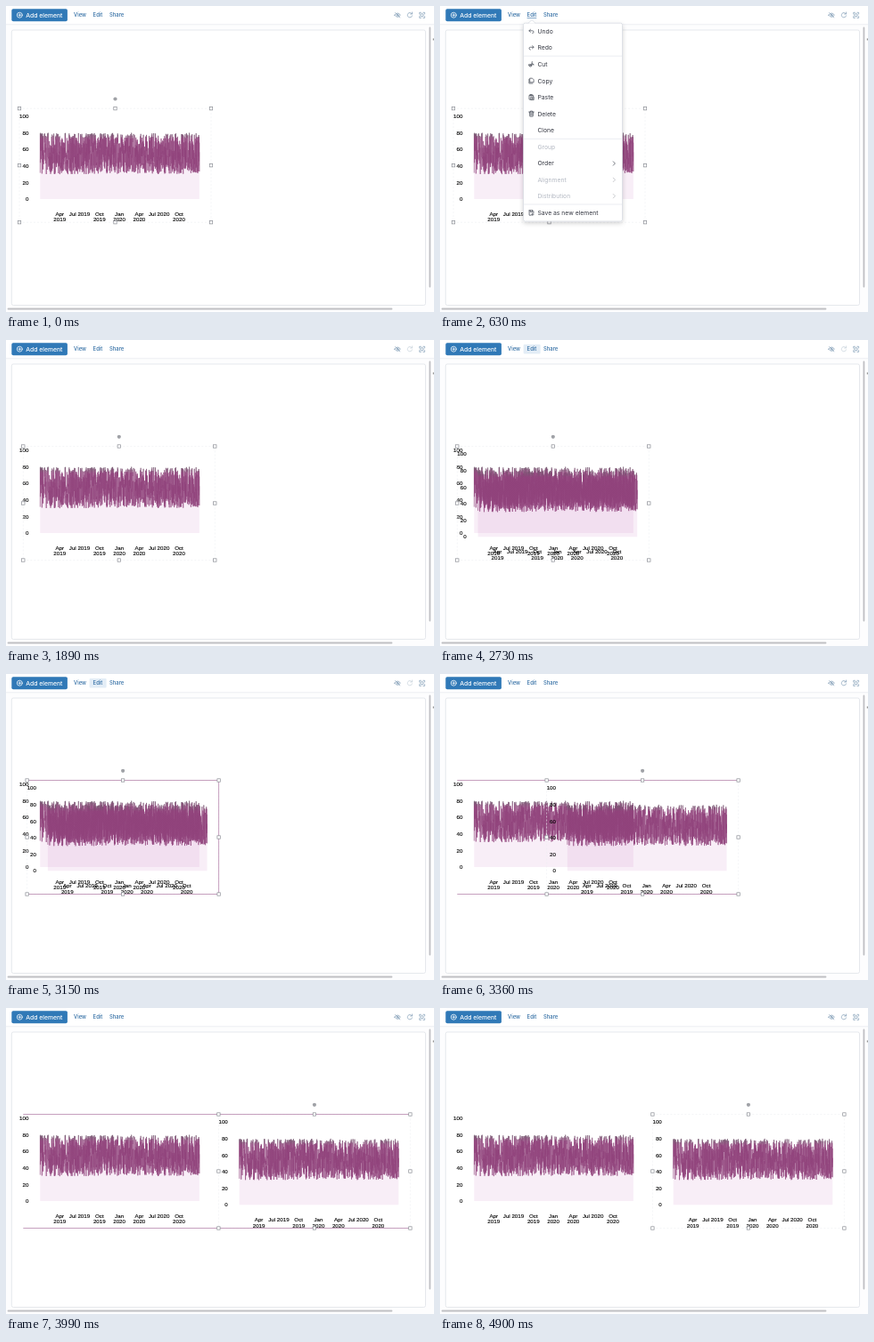
These frames come from a looping animation (480x344 px, 4.97 s). An HTML page:

```html
<!DOCTYPE html>
<html lang="en">
<head>
<meta charset="utf-8">
<title>Clone a chart</title>
<style>
  html, body { margin: 0; width: 100%; height: 100%; overflow: hidden; background: #fff; }
  svg { display: block; width: 100vw; height: 100vh; }
  text { font: 6.8px Inter, sans-serif; fill: #343741; }
  .axis text { font: 6.2px "Liberation Sans", Arial, sans-serif; fill: #000; stroke: #000; stroke-width: .12; }
  .link { font-size: 5.9px; font-weight: 500; fill: #2f6ca3; }
  .button { font-weight: 500; fill: #fff; }
  .off { fill: #b4b9c3; }
  .icon { fill: none; stroke: #4a4f5a; stroke-width: .75; stroke-linecap: round; stroke-linejoin: round; }
  .tool { stroke: #7f9bb5; stroke-width: .7; }
  .faded { stroke: #c3ced9; }
  .rule { stroke: #e3e6ec; stroke-width: .7; }
  .handle { fill: #fff; stroke: #8b8e95; stroke-width: .7; }
  .guide { stroke: #b888ae; stroke-width: .8; fill: none; }
</style>
</head>
<body>
<svg id="stage" viewBox="0 0 480 344" preserveAspectRatio="none"></svg>
<script>
const LOOP = 4970, STEP = 70;
const BOX = { x: 15, y: 115.2, w: 215, h: 128 };
const SHIFT = 4.3;

// Chart: dense noise between 30 and 80
function seeded(seed) {
  return () => (seed = (seed * 16807) % 2147483647) / 2147483647;
}

const valueY = v => 217 - v * .93;

function chart() {
  const rand = seeded(4242), count = 1400, left = 38.3, width = 178.6;
  const points = Array.from({ length: count }, (_, i) =>
    `${(left + i * width / (count - 1)).toFixed(2)},${valueY(30 + 50 * rand()).toFixed(1)}`);
  const line = 'M' + points.join('L');
  const ticks = [0, 20, 40, 60, 80, 100].map(v =>
    `<text x="25.4" y="${valueY(v) + 2.2}" text-anchor="end">${v}</text>`).join('');
  const dates = ['Apr 2019', 'Jul 2019', 'Oct 2019', 'Jan 2020', 'Apr 2020', 'Jul 2020', 'Oct 2020']
    .map((label, i) => {
      const x = 60.2 + i * 22.3;
      const lines = label.startsWith('Jul') ? [label] : label.split(' ');
      return lines.map((s, row) =>
        `<text x="${x}" y="${235.5 + row * 6.8}" text-anchor="middle">${s}</text>`).join('');
    }).join('');
  return `<g id="chart">
    <path d="${line}V217H${left}Z" fill="#b04fa5" fill-opacity=".095"/>
    <path d="${line}" fill="none" stroke="url(#ink)" stroke-width=".64" stroke-linejoin="bevel"/>
    <g class="axis">${ticks}${dates}</g></g>`;
}

// Edit menu
const ICONS = {
  undo: 'M-1-2.2-2.6-.7-1 .8M-2.6-.7H1.2Q2.5-.7 2.5.7T1.2 2.2',
  redo: 'M1-2.2 2.6-.7 1 .8M2.6-.7H-1.2Q-2.5-.7-2.5.7T-1.2 2.2',
  cut: 'M.8-3 .1 1.2M-2.8.3H2.8L.8-1M.1 1.2A1 1 0 1 1-.2.8M-2.8.3A1 1 0 1 0-1.2.4',
  copy: 'M-1.4-2.9H1L2.6-1.3V1.7H-1.4ZM-2.6-1.8V2.9H1.4',
  paste: 'M-.4 2.5H-2.5V-2.3H2.1V-1M-1.2-3H.8V-1.8H-1.2ZM-.3-.4H2.7V3H-.3ZM.6.8H1.8M.6 1.8H1.8',
  trash: 'M-2.8-2H2.8M-1-2V-3H1V-2M-2.1-2-1.7 3H1.7L2.1-2M-.6-.7V1.7M.6-.7V1.7',
  save: 'M-2.4-2.7H1.6L2.4-1.7V.2M-2.4-2.7V2.7H-.3M-1.2-2.7V-1H1V-2.7M1.3.4V3M0 1.7H2.6'
};
const ITEMS = [
  ['Undo', 28.5, 'undo'], ['Redo', 47, 'redo'], ['Cut', 65.6, 'cut'], ['Copy', 84.1, 'copy'],
  ['Paste', 102.6, 'paste'], ['Delete', 121.1, 'trash'], ['Clone', 139.7],
  ['Group', 158.5, '', 'off'], ['Order', 177, '', 'more'], ['Alignment', 195.4, '', 'off more'],
  ['Distribution', 213.7, '', 'off more'], ['Save as new element', 232.5, 'save']
];

function menuItem([label, y, icon, flags = '']) {
  const off = flags.includes('off');
  const id = label === 'Clone' ? 'id="cloneText"' : '';
  return `<text ${id} class="${off ? 'off' : ''}" x="109.4" y="${y + 2.4}">${label}</text>` +
    (icon ? `<path class="icon" transform="translate(102.5 ${y})" d="${ICONS[icon]}"/>` : '') +
    (flags.includes('more')
      ? `<path class="icon" d="M194.3 ${y - 2.2}l2.1 2.2-2.1 2.2" opacity="${off ? .4 : 1}"/>` : '');
}

function menu() {
  const rules = [56.2, 149.4, 223].map(y =>
    `<path class="rule" d="M94 ${y}H204"/>`).join('');
  return `<g id="menu">
    <rect x="93.5" y="19.2" width="111" height="222.8" rx="2" fill="#fff" stroke="#d3d7df" stroke-width=".7" filter="url(#shadow)"/>
    <path d="M98.8 19.5 103 15.6 107.2 19.5" fill="#fff" stroke="#d3d7df" stroke-width=".7"/>
    <rect id="cloneRow" x="94" y="131" width="110" height="18" fill="#e6f0f9"/>
    ${rules}${ITEMS.map(menuItem).join('')}</g>`;
}

function header() {
  return `<rect width="480" height="20.6" fill="#fff"/>
    <path class="rule" d="M0 20.8H480"/>
    <rect x="6.3" y="3.2" width="62.6" height="14" rx="1.8" fill="#3079b7"/>
    <g class="icon" style="stroke:#fff"><circle cx="15.3" cy="10.2" r="3"/><path d="M13.8 10.2h3M15.3 8.7v3"/></g>
    <text class="button" x="22.3" y="12.6">Add element</text>
    <rect id="editFocus" x="93.6" y="5" width="19" height="10.6" rx="1" fill="#e3edf6"/>
    <text class="link" x="76" y="12.4">View</text>
    <text class="link" id="edit" x="97.6" y="12.4">Edit</text>
    <text class="link" x="116" y="12.4">Share</text>
    <path class="icon tool" d="M435.8 10.2Q439.1 5.8 442.4 10.2 439.1 14.6 435.8 10.2ZM436.6 7.6 441.8 12.9"/>
    <circle class="icon tool" cx="439.1" cy="10.2" r="1"/>
    <path id="refresh" class="icon tool" d="M455.3 8.8A2.7 2.7 0 1 0 455.6 10.9M455.6 7V9H453.6"/>
    <path class="icon tool" d="M463.7 9V7.3h1.7M467.9 7.3h1.7V9M469.6 11.7v1.7h-1.7M465.4 13.4h-1.7v-1.7M465.3 8.9h2.7v2.8h-2.7z"/>`;
}

function handles() {
  const { x, y, w, h } = BOX;
  const squares = [0, .5, 1].flatMap(v => [0, .5, 1].map(u => u === .5 && v === .5 ? '' :
    `<rect class="handle" x="${x + u * w - 1.7}" y="${y + v * h - 1.7}" width="3.4" height="3.4"/>`)).join('');
  return `<g id="handles">${squares}
    <circle cx="${x + w / 2}" cy="${y - 10.7}" r="2.1" fill="#a0a2a7"/></g>`;
}

document.getElementById('stage').innerHTML = `
  <defs>
    <linearGradient id="ink" gradientUnits="userSpaceOnUse" x1="0" x2="0" y1="142" y2="150">
      <stop stop-color="#6f5c6d"/><stop offset="1" stop-color="#90427b"/>
    </linearGradient>
    <filter id="shadow" x="-20%" y="-20%" width="140%" height="140%">
      <feDropShadow dx="0" dy="2" stdDeviation="2.5" flood-color="#000" flood-opacity=".18"/>
    </filter>
  </defs>
  <rect width="480" height="344" fill="#fdfdfe"/>
  ${header()}
  <rect x="6.3" y="27" width="464.2" height="309.4" rx="2" fill="#fff" stroke="#dfe2e8" stroke-width=".8"/>
  <path d="M475.4 24.5V315.5M2.5 340.5H432.5" stroke="#bfc0c3" stroke-width="1.8" stroke-linecap="round"/>
  <path d="M479.3 36.5V38.5" stroke="#777" stroke-width="1"/>
  ${chart()}
  <path id="midGuide" class="guide"/>
  <use id="copy" href="#chart"/>
  <rect id="frame" x="${BOX.x}" y="${BOX.y}" width="${BOX.w}" height="${BOX.h}" fill="none"
    stroke="#edeff2" stroke-width=".6" stroke-dasharray="2 2"/>
  <path id="guides" class="guide"/>
  ${handles()}
  ${menu()}`;

const parts = Object.fromEntries(
  ['menu', 'cloneRow', 'cloneText', 'edit', 'editFocus', 'refresh', 'copy', 'frame', 'handles', 'guides', 'midGuide']
    .map(id => [id, document.getElementById(id)]));
const show = (node, on) => node.setAttribute('visibility', on ? 'visible' : 'hidden');
const underline = (node, on) => { node.style.textDecoration = on ? 'underline' : 'none'; };
const within = (t, a, b) => t >= a && t < b;
const clamp = v => Math.max(0, Math.min(1, v));

// Drag legs: [start, end, from, to, slowdown]
const DRAG = [
  [3150, 3360, 8.6, 104.6, 0],
  [3360, 3640, 104.6, 198, .4],
  [3640, 3990, 198, 223.4, 1]
];

function offsetX(t) {
  if (t < 1750) return 0;
  if (t < 3150) return SHIFT;
  const [a, b, from, to, k] = DRAG.find(leg => t < leg[1]) || DRAG[2];
  const u = clamp((t - a) / (b - a));
  return from + (to - from) * u * (1 + k - k * u);
}

function render(time) {
  const t = Math.floor((time % LOOP) / STEP) * STEP;
  const dx = offsetX(t), dy = t < 1750 ? 0 : SHIFT;
  for (const node of [parts.copy, parts.frame, parts.handles])
    node.setAttribute('transform', `translate(${dx} ${dy})`);
  show(parts.copy, t >= 1960);

  const opening = clamp((t - 350) / 280), closing = clamp((t - 1610) / 210);
  const open = opening * (2 - opening) * (1 - closing);
  parts.menu.setAttribute('opacity', open);
  parts.menu.setAttribute('transform', `translate(0 ${(1 - opening) ** 2 * 4})`);
  show(parts.cloneRow, t >= 1540);
  underline(parts.cloneText, t >= 1540);
  underline(parts.edit, within(t, 140, 1680));
  show(parts.editFocus, within(t, 2100, 3220));
  parts.refresh.classList.toggle('faded', within(t, 1820, 3220));

  const x1 = BOX.x + dx, x2 = x1 + BOX.w;
  const top = BOX.y + SHIFT, bottom = top + BOX.h;
  const start = t < 3220 ? x1 : BOX.x + SHIFT;
  const side = t < 3220 ? `M${x2} ${top}V${bottom}` : '';
  parts.guides.setAttribute('d', `M${start} ${top}H${x2}M${start} ${bottom}H${x2}${side}`);
  show(parts.guides, within(t, 3150, 4130));
  parts.midGuide.setAttribute('d', `M${x1} ${top + BOX.h / 2}H${x2}`);
  show(parts.midGuide, within(t, 3570, 3710));
}

const begin = performance.now();

function tick(now) {
  render(Math.max(0, now - begin));
  requestAnimationFrame(tick);
}

render(0);
requestAnimationFrame(tick);
</script>
</body>
</html>
```
